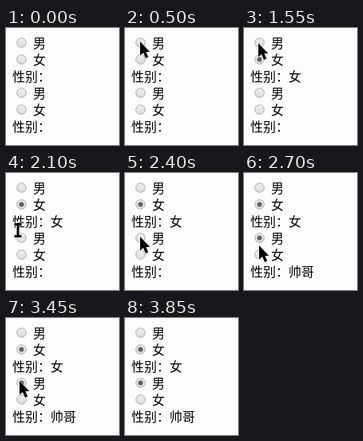
An HTML page for the animation above (4550 ms loop, 142x147 px).

```html
<!DOCTYPE html>
<html lang="zh-CN">
<head>
<meta charset="utf-8">
<style>
html, body { margin: 0; width: 100%; height: 100%; overflow: hidden; background: #fdfdfd; }
svg { display: block; }
text { font: 350 16px "Noto Sans CJK SC", "Noto Sans CJK", sans-serif; fill: #000; }
.ring { fill: url(#face); stroke: #a9a9a9; }
.dot { fill: #606060; visibility: hidden; }
.on .dot { visibility: visible; }
#arrow, #beam { stroke: #fff; paint-order: stroke; }
</style>
</head>
<body>
<svg width="142" height="147" viewBox="0 0 142 147">
  <defs>
    <linearGradient id="face" x2="0" y2="1">
      <stop stop-color="#efefef"/><stop offset="1" stop-color="#dcdcdc"/>
    </linearGradient>
  </defs>
  <g id="form"></g>
  <path id="arrow" d="M0 0V17.5L4 14L7 21L10.3 19.6L7.4 13H12.3Z"/>
  <path id="beam" d="M-4.5 -9H4.5V-6H1.5V6H4.5V9H-4.5V6H-1.5V-6H-4.5Z"/>
</svg>
<script>
const LOOP = 4550, STEP = 50, ROW = 21;
const form = document.getElementById('form');
const arrow = document.getElementById('arrow');
const beam = document.getElementById('beam');

// The pointer rests between glides: [start, duration, x, y]
const entry = [131, 24];
const glides = [
  [50, 50, 37, 24], [200, 0, 3, 17], [300, 50, 10, 17], [450, 50, 19, 17],
  [800, 250, 18, 40], [1250, 150, 18, 19], [1650, 150, 17, 40],
  [2000, 180, 14, 92], [2300, 100, 19, 80], [2600, 200, 18, 102],
  [2900, 200, 17, 79], [3650, 150, 101, 94]
];

// Every click in a group switches to its other option
const groups = [
  { words: ['男', '女'], clicks: [750, 1200, 1600, 1950] },
  { words: ['帅哥', '美女'], clicks: [2600, 2900, 3200] }
];

const option = (label, y) => `<g class="radio">
  <circle class="ring" cx="19.5" cy="${y - 6.5}" r="5.8"/>
  <circle class="dot" cx="19.5" cy="${y - 6.5}" r="3"/>
  <text x="34" y="${y}">${label}</text></g>`;

form.innerHTML = groups.map((_, i) => {
  const y = 25 + i * 3 * ROW;
  return option('男', y) + option('女', y + ROW) +
    `<text x="8" y="${y + 2 * ROW}">性别：<tspan class="answer" x="56"></tspan></text>`;
}).join('');

const radios = form.querySelectorAll('.radio');
const answers = form.querySelectorAll('.answer');

const smooth = p => p * p * (3 - 2 * p);

function pointerAt(t) {
  let [x, y] = entry;
  for (const [start, time, toX, toY] of glides) {
    if (t < start) break;
    const p = time ? smooth(Math.min((t - start) / time, 1)) : 1;
    x += (toX - x) * p;
    y += (toY - y) * p;
  }
  return [Math.round(x), Math.round(y)];
}

function place(el, shown, x, y) {
  el.style.visibility = shown ? 'visible' : 'hidden';
  el.setAttribute('transform', `translate(${x} ${y})`);
}

function draw() {
  const now = performance.now() % LOOP;
  const t = now - now % STEP;
  const [x, y] = pointerAt(t);
  const shown = (t >= 50 && t < 150) || (t >= 300 && t < 3850);
  const overText = y > 60 && y < 74;
  place(arrow, shown && !overText, x, y);
  place(beam, shown && overText, x, y + 2);

  groups.forEach(({ words, clicks }, i) => {
    const count = clicks.filter(c => c <= t).length;
    const pick = count ? (count - 1) % 2 : -1;
    words.forEach((_, j) => radios[2 * i + j].classList.toggle('on', j === pick));
    answers[i].textContent = words[pick] || '';
  });
  requestAnimationFrame(draw);
}
draw();
</script>
</body>
</html>
```
